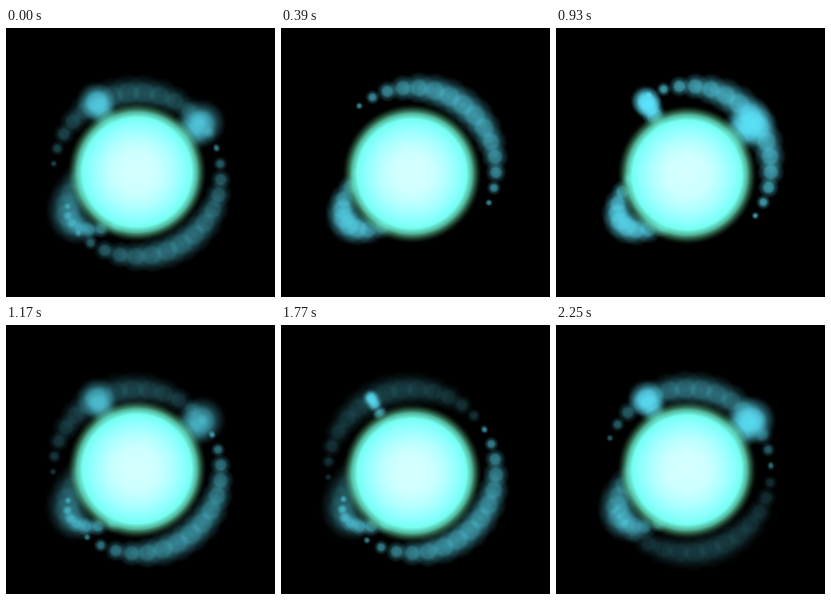
An HTML page with a canvas that plays this animation: 269x269 px, repeating every 2310 ms.

```html
<!DOCTYPE html>
<html>
<head>
<meta charset="utf-8">
<style>
html, body { margin: 0; width: 100%; height: 100%; overflow: hidden; background: #000; }
canvas { display: block; width: 100vw; height: 100vh; }
</style>
</head>
<body>
<canvas id="stage" width="269" height="269"></canvas>
<script>
const ctx = document.getElementById('stage').getContext('2d');
const LOOP = 2310, STEP = 60, HALF = 9.75, CYCLE = HALF * 2;
const TAU = Math.PI * 2, RAD = Math.PI / 180;

const ramp = (t, from, to) => Math.min(1, Math.max(0, (t - from) / (to - from)));
// Fade in, stay, then fade out while the next one appears
const life = age => ramp(age, -2, 2) * (1 - ramp(age, 5, 12.5));

function disc(x, y, radius, stops) {
  const g = ctx.createRadialGradient(x, y, 0, x, y, radius);
  stops.forEach(([at, color]) => g.addColorStop(at, color));
  ctx.fillStyle = g;
  ctx.fillRect(x - radius, y - radius, radius * 2, radius * 2);
}

function bead(x, y, r, alpha) {
  const tint = a => `rgba(92,228,252,${a * alpha})`;
  disc(x, y, r * 1.65, [[0, tint(.8)], [.4, tint(.68)], [.62, tint(.3)], [1, tint(0)]]);
}

// Beads along a tilted ellipse, thickest in the middle
function chain({ y = 144, a = 83, b, tilt = 0 }, middle, count, gap, size, alpha) {
  if (alpha <= 0) return;
  const c = Math.cos(tilt * RAD), s = Math.sin(tilt * RAD);
  for (let i = 0; i < count; i++) {
    const angle = (middle + (i - (count - 1) / 2) * gap) * RAD;
    const u = a * Math.cos(angle), v = b * Math.sin(angle);
    const r = 2.5 + (size - 2.5) * Math.sin(Math.PI * i / (count - 1));
    bead(131 + u * c - v * s, y + u * s + v * c, r, alpha);
  }
}

function ring(age) {
  const y = 142.5 + 4 * Math.cos(TAU * age / HALF);
  chain({ y, a: 84, b: 82 }, 58 - 15.8 * age, 15, 10.9, 12, life(age));
}

function crescent(age) {
  chain({ b: 36, tilt: -37 }, 132 + 6.8 * age, 12, 13, 6 + .8 * age, life(age));
}

function jet(age) {
  chain({ b: 3, tilt: 60 }, 180, 11, 13, 4.5 + .8 * age, life(age));
}

function head(age) {
  chain({ b: 8, tilt: -37 }, 0, 11, 13, 14.5, life(age) * ramp(age, 3, 8));
}

function core(t) {
  const y = 146 - 2.6 * Math.cos(TAU * (t - 2.5) / CYCLE);
  disc(131, y, 70, [
    [0, '#d6ffff'], [.3, '#cdffff'], [.5, '#b0ffff'], [.68, '#8cffff'], [.78, '#75fff2'],
    [.86, 'rgba(100,225,190,.8)'], [.93, 'rgba(75,155,110,.4)'], [1, 'rgba(20,50,30,0)']
  ]);
}

function draw(ms) {
  const t = Math.floor((ms % LOOP + STEP / 2) / STEP) % CYCLE;
  ctx.fillStyle = '#000';
  ctx.fillRect(0, 0, 269, 269);
  for (let n = -1; n <= 2; n++) {
    const age = t - n * HALF;
    ring(age);
    crescent(age);
    if (n % 2) {
      jet(age);
      head(age);
    }
  }
  core(t);
}

let began;
function tick(now) {
  began ??= now;
  draw(now - began);
  requestAnimationFrame(tick);
}
draw(0);
requestAnimationFrame(tick);
</script>
</body>
</html>
```
